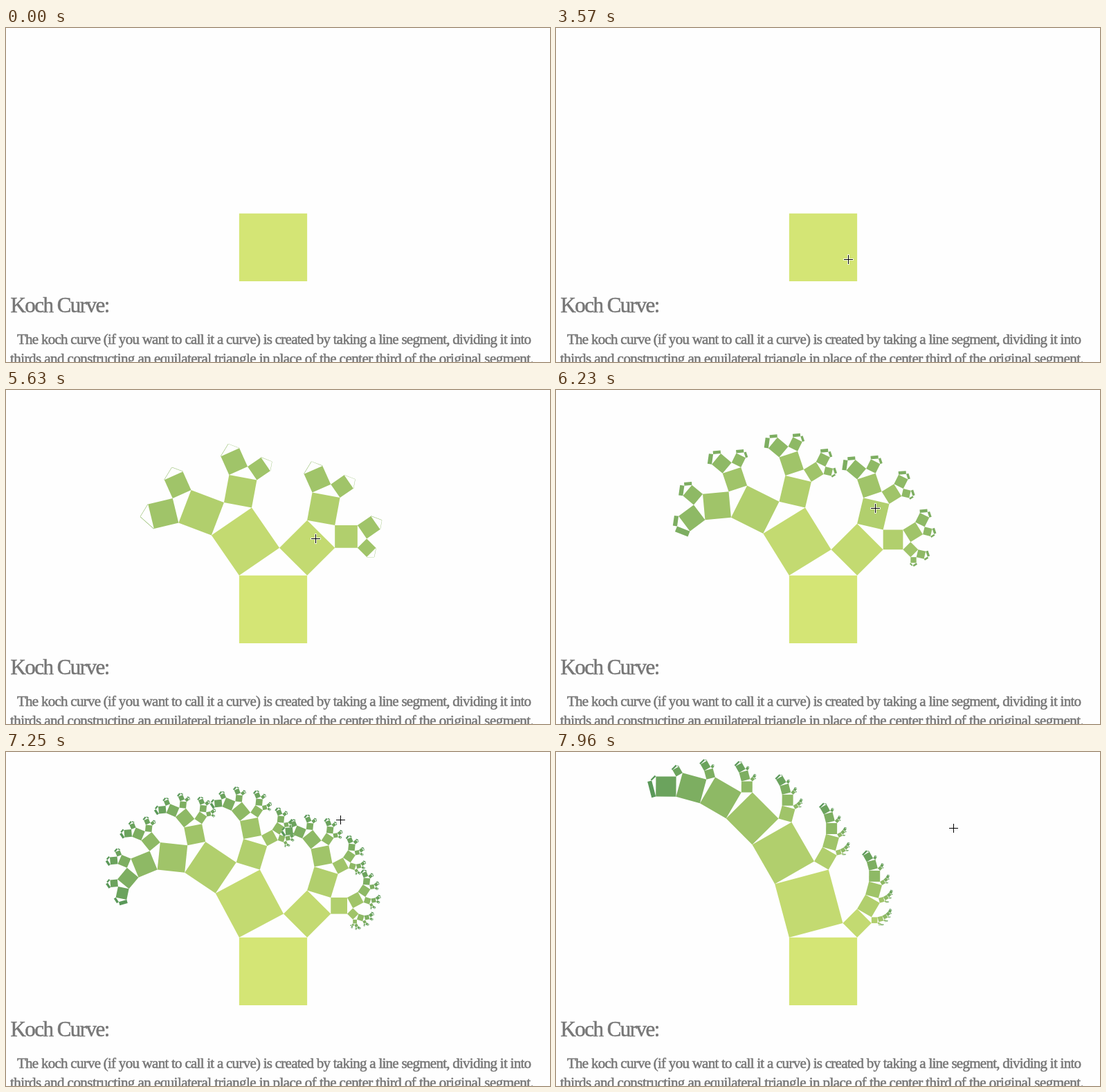
An HTML page with a canvas that plays this animation: 786x484 px, repeating every 8 s.

```html
<!DOCTYPE html>
<html lang="en">
<head>
<meta charset="utf-8">
<title>Fractal tree</title>
<style>
  html, body { margin: 0; width: 100%; height: 100%; overflow: hidden; background: #fefefe; }
  svg, canvas { position: absolute; left: 0; top: 0; width: 786px; height: 484px; display: block; }
  text {
    font: 21px "Liberation Serif", "Times New Roman", serif;
    fill: #777; stroke: #777; stroke-width: .55px; white-space: pre;
  }
  .title { font-size: 31px; letter-spacing: -1.55px; }
  .first { letter-spacing: -.74px; }
  .second { letter-spacing: -.55px; }
</style>
</head>
<body>
<svg viewBox="0 0 786 484">
  <text class="title" x="6.5" y="412">Koch Curve:</text>
  <text class="first" x="16" y="458">The koch curve (if you want to call it a curve) is created by taking a line segment, dividing it into</text>
  <text class="second" x="6" y="485.5">thirds and constructing an equilateral triangle in place of the center third of the original segment.</text>
</svg>
<canvas width="786" height="484"></canvas>
<script>
const WIDTH = 786, HEIGHT = 484, LOOP = 8000;
const SIDE = WIDTH / 8, CENTER = 386, BOTTOM = 367;
const LAG = 60; // the tree trails the pointer by this many ms
const ctx = document.querySelector('canvas').getContext('2d');

// pointer stops: time, x, y
const stops = [
  [990, 664, 477],
  [1770, 440, 400],
  [2010, 430, 376],
  [2250, 430, 361],
  [2485, 430, 361],
  [2520, 426, 370],
  [3040, 426, 370],
  [3570, 422, 335],
  [4650, 431, 267],
  [5170, 431, 267],
  [5960, 458, 178],
  [6170, 461, 171],
  [6240, 461, 171],
  [7190, 483, 98],
  [7260, 483, 98],
  [7620, 507, 94],
  [7900, 570, 104],
  [7960, 574, 110]
];

function pointerAt(t) {
  const i = stops.findIndex(s => s[0] > t);
  if (i < 0) return stops[stops.length - 1].slice(1);
  const b = stops[i], a = stops[i - 1] || b;
  const p = a === b ? 0 : (t - a[0]) / (b[0] - a[0]);
  return [a[1] + (b[1] - a[1]) * p, a[2] + (b[2] - a[2]) * p];
}

// x sets the lean, y the number of levels
function treeAt(t) {
  const [x, y] = pointerAt(t);
  return {
    height: .5 - (x - CENTER) / 636,
    depth: Math.max(0, (332 - y) / 36.4)
  };
}

function polygon(points) {
  ctx.beginPath();
  for (const [x, y] of points) ctx.lineTo(x, y);
  ctx.closePath();
}

function shade(level) {
  return `rgb(${212 - 17.5 * level}, ${229 - 11 * level}, ${117 - 4 * level})`;
}

// (x, y) is the left base corner, (vx, vy) the base edge
function branch(x, y, vx, vy, level, tree) {
  const grown = Math.min(1, tree.depth + 1 - level);
  if (grown <= 0) return;
  const nx = vy, ny = -vx;
  polygon([
    [x, y],
    [x + nx * grown, y + ny * grown],
    [x + vx + nx * grown, y + vy + ny * grown],
    [x + vx, y + vy]
  ]);
  ctx.fillStyle = shade(level);
  ctx.fill();

  const h = tree.height, u = 1 - h;
  const lx = vx * u + nx * h, ly = vy * u + ny * h;
  const tx = x + nx, ty = y + ny;
  branch(tx, ty, lx, ly, level + 1, tree);
  branch(tx + lx, ty + ly, vx - lx, vy - ly, level + 1, tree);
}

function drawArrow(x, y) {
  ctx.save();
  ctx.translate(x, y);
  polygon([[0, 0], [0, 14], [3.2, 11.1], [5.4, 16.2], [7.8, 15.2], [5.6, 10.2], [10, 10]]);
  ctx.lineJoin = 'round';
  ctx.lineWidth = 2;
  ctx.strokeStyle = '#fff';
  ctx.shadowColor = 'rgba(0, 0, 0, .4)';
  ctx.shadowBlur = 3;
  ctx.shadowOffsetY = 1;
  ctx.stroke();
  ctx.shadowColor = 'transparent';
  ctx.fillStyle = '#000';
  ctx.fill();
  ctx.restore();
}

function drawCross(x, y) {
  ctx.fillStyle = 'rgba(255, 255, 255, .8)';
  ctx.fillRect(x - 7, y - 1, 15, 3);
  ctx.fillRect(x - 1, y - 7, 3, 15);
  ctx.fillStyle = '#000';
  ctx.fillRect(x - 6, y, 13, 1);
  ctx.fillRect(x, y - 6, 1, 13);
}

function draw(t) {
  ctx.clearRect(0, 0, WIDTH, HEIGHT);
  branch(CENTER - SIDE / 2, BOTTOM, SIDE, 0, 0, treeAt(t - LAG));
  if (t < stops[0][0]) return;
  const [x, y] = pointerAt(t).map(Math.round);
  if (y > BOTTOM) drawArrow(x, y);
  else drawCross(x, y);
}

const start = performance.now();
function tick() {
  draw((performance.now() - start) % LOOP);
  requestAnimationFrame(tick);
}
tick();
</script>
</body>
</html>
```
